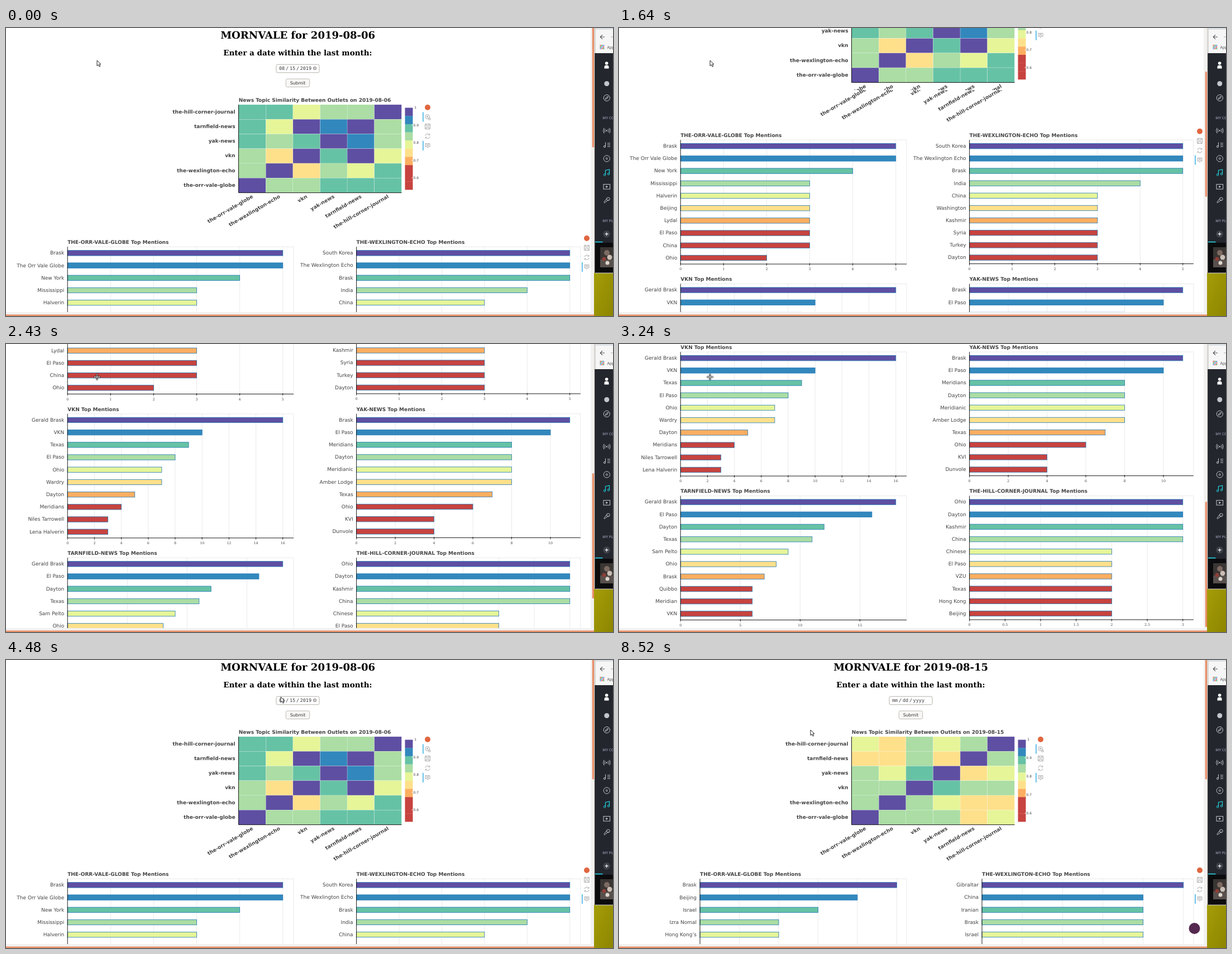
Recreate the animation shown at these times as an HTML page. Size 1087 by 515 pixels, loop 9540 ms.

```html
<!DOCTYPE html>
<html lang="en">
<head>
<meta charset="utf-8">
<title>News topic dashboard</title>
<style>
  html, body { margin: 0; width: 100%; height: 100%; overflow: hidden; background: #fff; }
  svg { display: block; }
  text { font: 9px "DejaVu Sans", sans-serif; fill: #444; white-space: pre; text-rendering: geometricPrecision; }
  .b { font-weight: bold; }
  .e { text-anchor: end; }
  .m { text-anchor: middle; }
  .h1 { font: bold 18px "DejaVu Serif", serif; fill: #000; }
  .h2 { font: bold 13.5px "DejaVu Serif", serif; fill: #000; }
  .tick { font: 6.3px "DejaVu Serif", serif; }
  .scale { font-size: 6px; }
  .mono { font: 8.5px "DejaVu Sans Mono", monospace; fill: #3c3c3c; }
  .button { font-size: 7.8px; fill: #333; }
  .cal { font-size: 6.4px; fill: #3f3f3f; }
  .cal.off { fill: #aaa; }
  .cal.end { fill: #c0392b; }
  .cal.day { fill: #8f9ba5; }
  .cal.rest { fill: #cf8d82; }
  .cal.on { fill: #fbe3c9; }
  .side { font: bold 6.3px "Open Sans", sans-serif; fill: #85879c; }
  .apps { font: 7px "Open Sans", sans-serif; fill: #444; }
  .status { font-size: 7.5px; fill: #333; }
  .line { fill: none; stroke: #a3a3a3; stroke-width: .9; }
  .nav { fill: none; stroke: #c3c6cb; stroke-width: 1; }
  #calendar { filter: drop-shadow(0 1px 2px rgba(0, 0, 0, .35)); }
</style>
</head>
<body>
<svg id="stage" width="1087" height="515" viewBox="0 0 1087 515"></svg>
<script>
const LOOP = 9540;
const PURPLE = '#5e4fa2', BLUE = '#3288bd', TEAL = '#66c2a5', GREEN = '#abdda4',
      LIME = '#e6f598', SAND = '#fee08b', AMBER = '#fdae61', RED = '#c7433f';
const PALETTE = [PURPLE, BLUE, TEAL, GREEN, LIME, SAND, AMBER, RED, RED, RED];
const CELL = { P: PURPLE, B: BLUE, T: TEAL, G: GREEN, Y: LIME, O: SAND };
const OUTLETS = ['the-hill-corner-journal', 'tarnfield-news', 'yak-news', 'vkn',
                 'the-wexlington-echo', 'the-orr-vale-globe'];

const text = (x, y, s, cls = '', more = '') => `<text x="${x}" y="${y}" class="${cls}" ${more}>${s}</text>`;
const rect = (x, y, w, h, fill, more = '') =>
  `<rect x="${x}" y="${y}" width="${w}" height="${h}" fill="${fill}" ${more}/>`;
const path = (d, more = 'class="line"') => `<path d="${d}" ${more}/>`;
const circle = (x, y, r, more) => `<circle cx="${x}" cy="${y}" r="${r}" ${more}/>`;
const group = (id, ...parts) => `<g id="${id}">${parts.join('')}</g>`;
const at = (x, y, s) => `<g transform="translate(${x} ${y})">${s}</g>`;
const range = n => [...Array(n).keys()];

// ---- plot tools
const ICON = {
  zoom: circle(-.5, -.5, 3.8, 'class="line"') + path('M-2.5-.5h4M-.5-2.5v4M2 2h3v3h-3z'),
  save: path('M-4.5-4.5h9v9h-9zM-2.5-4.5v3h5v-3M-2.5 4.5v-3.5h5v3.5'),
  reset: path('M-4-.8A4 4 0 0 1 3.4-2.2M4 .8A4 4 0 0 1-3.4 2.2M3.8-4.4v2.4h-2.4M-3.8 4.4v-2.4h2.4'),
  hover: path('M-4-3.8h8v5.6h-2.6L0 4-1.4 1.8H-4zM-2.4-2h4.8M-2.4 0h4.8')
};
const toolbar = (x, y, names, active) =>
  circle(x, y, 5, 'fill="#e0663f"') +
  names.map((n, i) => at(x, y + 17.1 * (i + 1), ICON[n])).join('') +
  active.map(i => rect(x - 8.8, y + 17.1 * (i + 1) - 8.5, 1.4, 17, '#26aae1')).join('');

// ---- heat map
function heatmap(date, rows, gap) {
  const w = 48.6, h = 26.25, x0 = 416.7, y0 = 137;
  let s = text(416.7, 131.7, 'News Topic Similarity Between Outlets on ' + date, 'b');
  rows.split(' ').forEach((row, r) => {
    [...row].forEach((c, i) => {
      s += rect(x0 + i * w, y0 + r * h, w, h, CELL[c], 'stroke="#fff" stroke-opacity=".45" stroke-width=".5"');
    });
    s += text(410.5, y0 + h * (r + .5) + 2.6, OUTLETS[r], 'b e');
    const x = x0 + w * (5.5 - r) + 2;
    s += text(x, 303, OUTLETS[r], 'b e', `transform="rotate(-30 ${x} 303)"`);
  });
  s += path('M416.5 137V294.6H708.5', 'fill="none" stroke="#000" stroke-width=".9"');
  PALETTE.forEach((c, i) => { s += rect(714.5, 142.6 + i * 14.65, 14, 14.9, c); });
  range(5).forEach(i => {
    const y = 142 + i * gap;
    if (i) s += path(`M726 ${y}h2.5`, 'stroke="#fff" stroke-width=".7"');
    s += text(i ? 729.6 : 731.3, y + 2.1, i ? '0.' + (10 - i) : '1', 'scale');
  });
  return s + toolbar(755, 142, ['zoom', 'save', 'reset', 'hover'], [0, 3]);
}

// ---- bar charts, two columns by three rows
function chart(col, row, title, max, step, labels, values, x0 = col ? 627.6 : 110.2) {
  const right = col ? 1028.8 : 515, top = 391.3 + 257.4 * row, bottom = top + 222 - col * .5;
  const scale = (right - x0) / 1.05 / max;
  let s = text(x0, top - 5, title.toUpperCase() + ' Top Mentions', 'b');
  s += path(`M${x0} ${top}H${right}V${bottom}`, 'fill="none" stroke="#e5e5e5" stroke-width=".8"');
  for (let v = step; v <= max; v += step) {
    s += path(`M${x0 + v * scale} ${top}V${bottom}`, 'stroke="#e5e5e5" stroke-width=".8"');
  }
  const vals = values.split(' ');
  labels.split(',').forEach((name, i) => {
    const y = top + 11.1 + 22.2 * i - col * .05 * i;
    s += rect(x0, y - 4.7, vals[i] * scale, 9.4, PALETTE[i], 'stroke="#1f77b4" stroke-width=".8"');
    s += text(x0 - 6, y + 2.9, name, 'e');
  });
  s += path(`M${x0} ${top}V${bottom}H${right}`, 'fill="none" stroke="#000" stroke-width=".9"');
  for (let v = 0; v <= max; v += step) {
    const x = x0 + v * scale;
    s += path(`M${x} ${bottom - 1.5}v4.5`, 'stroke="#000" stroke-width=".8"') + text(x, bottom + 11.3, v, 'tick m');
  }
  return s;
}

const lower = toolbar(1040, 376, ['save', 'reset', 'hover'], [2]);

const before = group('before',
  heatmap('2019-08-06', 'TTYGGP TYPBPG TGTPBG GOPTPY GPOGYT PGGTTT', 31.5),
  chart(0, 0, OUTLETS[5], 5, 1, 'Brask,The Orr Vale Globe,New York,Mississippi,Halverin,Beijing,Lydal,El Paso,China,Ohio', '5 5 4 3 3 3 3 3 3 2'),
  chart(1, 0, OUTLETS[4], 5, 1, 'South Korea,The Wexlington Echo,Brask,India,China,Washington,Kashmir,Syria,Turkey,Dayton', '5 5 5 4 3 3 3 3 3 3'),
  chart(0, 1, OUTLETS[3], 16, 2, 'Gerald Brask,VKN,Texas,El Paso,Ohio,Wardry,Dayton,Meridians,Niles Tarrowell,Lena Halverin', '16 10 9 8 7 7 5 4 3 3'),
  chart(1, 1, OUTLETS[2], 11, 2, 'Brask,El Paso,Meridians,Dayton,Meridianic,Amber Lodge,Texas,Ohio,KVI,Dunvole', '11 10 8 8 8 8 7 6 4 4'),
  chart(0, 2, OUTLETS[1], 18, 5, 'Gerald Brask,El Paso,Dayton,Texas,Sam Pelto,Ohio,Brask,Quibbo,Meridian,VKN', '18 16 12 11 9 8 7 6 6 6'),
  chart(1, 2, OUTLETS[0], 3, .5, 'Ohio,Dayton,Kashmir,China,Chinese,El Paso,VZU,Texas,Hong Kong,Beijing', '3 3 3 3 2 2 2 2 2 2'),
  lower);

const after = group('after',
  heatmap('2019-08-15', 'YOGYGP OOGOPG GYTPOY GGPTGG GPGYOO PGGGOY', 33),
  chart(0, 0, OUTLETS[5], 5, 1, 'Brask,Beijing,Israel,Izra Nomal,Hong Kong’s', '5 4 3 2 2', 145),
  chart(1, 0, OUTLETS[4], 5, 1, 'Gibraltar,China,Iranian,Brask,Israel', '5 4 4 4 4', 650),
  lower);

// ---- header and form
const dateText = (...parts) =>
  [parts[0], '/', parts[1], '/', parts[2]].map((p, i) => text([489, 501, 508, 520, 526.6][i], 75.3, p, 'mono')).join('');
const header = group('header',
  text(522.6, 19.4, '', 'h1 m', 'id="heading"'),
  text(522.4, 49, 'Enter a date within the last month:', 'h2 m'),
  rect(484, 65.2, 77, 14.6, '#fff', 'rx="2.5" stroke="#b6b1ab" id="field"'),
  group('focus', rect(488, 67, 13, 10.6, '#f09f47')),
  group('filled', dateText('08', '15', '2019'), circle(553, 72, 3.2, 'fill="#a8a8a8"'),
    path('M551.8 70.8l2.4 2.4m0-2.4l-2.4 2.4', 'stroke="#fff" stroke-width=".8"')),
  group('blank', dateText('mm', 'dd', 'yyyy')),
  rect(501.3, 91, 42.4, 14.4, '#f8f7f6', 'rx="2.5" stroke="#c0bbb5"'),
  text(522.5, 101, 'Submit', 'button m'));

// ---- date picker
function calendar() {
  const x = i => 500.4 + 18.65 * i;
  let s = rect(485, 86, 142.6, 128.6, '#fff', 'stroke="#c9c5c1" stroke-width=".8"');
  s += path('M501.5 95.5l-3.5 3.5 3.5 3.5M611.5 95.5l3.5 3.5-3.5 3.5', 'fill="none" stroke="#666"');
  s += rect(524.5, 93.7, 63, 10.8, '#fff', 'rx="2" stroke="#c4c0bb" stroke-width=".8"');
  s += text(531.3, 101.6, 'August 2019', 'cal') + path('M577.8 98l2.4 2.4 2.4-2.4', 'fill="none" stroke="#777" stroke-width=".8"');
  ['Sun', 'Mon', 'Tue', 'Wed', 'Thu', 'Fri', 'Sat'].forEach((d, i) => {
    s += text(x(i), 119.4, d, 'cal m ' + (i % 6 ? 'day' : 'rest'));
  });
  s += rect(566.8, 153.2, 16.4, 13, '#ef9d45', 'rx="1"');
  range(42).forEach(n => {
    const d = n - 3, off = d < 1 || d > 31;
    const cls = off ? 'off' : d === 15 ? 'on' : n % 7 % 6 ? '' : 'end';
    s += text(x(n % 7), 133.8 + 14.15 * Math.floor(n / 7), d < 1 ? d + 31 : d > 31 ? d - 31 : d, 'cal m ' + cls);
  });
  return s;
}

// ---- neighbouring windows
const dots = ['#e04a3f', '#3f9d57', '#4a86e0'];
const nav = 'class="nav"';
const side = [
  rect(1053, 0, 34, 515, '#d9d6d2'),
  rect(1053, 438, 34, 77, 'url(#wall)'),
  rect(1056, 0, 31, 46, '#f6f6f6'), rect(1056, 0, 31, 3, '#dee1e6'),
  path('M1072 16h-7.5M1068 12.2l-3.8 3.8 3.8 3.8', 'fill="none" stroke="#555" stroke-width="1.2"'),
  path('M1083 16h6', 'stroke="#bbb" stroke-width="1.2"'),
  ...range(9).map(i => rect(1063.6 + i % 3 * 2.8, 30.2 + Math.floor(i / 3) * 2.8, 2, 2, dots[(i + Math.floor(i / 3)) % 3])),
  text(1076.5, 37.2, 'Apps', 'apps'),
  rect(1055, 45, 32, 393, '#23262d'), rect(1055, 384, 32, 54, '#0c0c0e'),
  rect(1055, 437.6, 32, 1, '#d8d8d8'), rect(1054.3, 45, 1, 393, '#111'),
  circle(1075.6, 63, 2.8, 'fill="#fff"'), path('M1071.5 72.5v-3q0-3 4-3t4 3v3z', 'fill="#fff"'),
  circle(1075.8, 99.5, 4.5, 'fill="#c3c6cb"'),
  circle(1075.8, 125, 5.6, nav), path('M1078.5 122.3l-1.7 3.7-3.7 1.7 1.7-3.7z', nav),
  text(1068.3, 162.7, 'MY COLLECTION', 'side'),
  circle(1075.8, 183.5, 1.3, 'fill="#c3c6cb"'),
  path('M1073 180.5q-1.8 3 0 6M1078.6 180.5q1.8 3 0 6M1071 178.7q-3 4.8 0 9.6M1080.6 178.7q3 4.8 0 9.6', nav),
  path('M1073.5 212v-7.5M1077 206h5M1077 209h5M1077 212h5', nav), circle(1072, 212, 1.6, nav),
  circle(1075.8, 233.5, 5.6, nav), circle(1075.8, 233.5, 1.5, nav),
  path('M1073.5 262.5v-8l7-1.6v8', 'fill="none" stroke="#1fd3e0" stroke-width="1.2"'),
  circle(1072, 262.5, 1.7, 'fill="none" stroke="#1fd3e0"'), circle(1079, 261, 1.7, 'fill="none" stroke="#1fd3e0"'),
  rect(1070, 279.5, 11.6, 8.6, 'none', nav), path('M1074.4 281.6l3.6 2.2-3.6 2.2z', 'fill="#c3c6cb"'),
  circle(1078.4, 305.8, 2.8, nav), path('M1076.3 304.3l-5.6 7.4 1 1 7.4-5.6', nav),
  text(1068.3, 347.3, 'MY PLAYLISTS', 'side'),
  circle(1075.6, 368.4, 6.4, 'fill="#3d4048"'), path('M1072.6 368.4h6M1075.6 365.4v6', 'stroke="#fff" stroke-width="1.1"'),
  rect(1055, 381.8, 13.5, 1.6, '#1fd3e0'),
  rect(1064, 392, 23, 36, '#3a3634'), rect(1064, 414, 23, 14, '#57504c'),
  circle(1076, 402, 5, 'fill="#7d6a62"'), circle(1081, 410, 4.5, 'fill="#c9bdb4"'),
  circle(1071, 413, 3.5, 'fill="#8e3f38"'), circle(1077, 420, 3.5, 'fill="#ddd4cb"')
].join('');

const cross = 'M0-5.6V-2M0 2V5.6M-5.6 0H-2M2 0H5.6';
document.getElementById('stage').innerHTML = `
  <defs>
    <linearGradient id="wall" x1="0" y1="0" x2="1" y2="1">
      <stop offset="0" stop-color="#a59d08"/><stop offset="1" stop-color="#8d8500"/>
    </linearGradient>
    <clipPath id="strip"><rect width="1047" height="111"/></clipPath>
  </defs>` +
  rect(0, 0, 1053, 515, '#f2f1f0') +
  `<svg width="1047" height="508">` + rect(0, 0, 1047, 508, '#fff') +
    group('page', header, before, after) +
    `<g id="tear" clip-path="url(#strip)">` + rect(0, 0, 1047, 111, '#fff') +
      `<use href="#page" transform="translate(0 -6)"/></g>` +
    group('badge', circle(1030.5, 480, 10, 'fill="#54284f"')) +
  `</svg>` +
  rect(1049.8, 0, 3.4, 224, '#e98e68', 'id="thumb" rx="1.5"') +
  rect(0, 512.4, 1053.5, 2.6, '#ec916b') +
  side +
  group('calendar', calendar()) +
  group('status', rect(0, 502.5, 180.5, 12.5, '#eeedec', 'stroke="#bbb" stroke-width=".8"'),
    text(4, 511.4, 'Transferring data from localhost…', 'status')) +
  group('cursor',
    group('arrow', path('M0 0V9.8L2.3 7.6 4 11.2 5.7 10.4 4.1 6.9H7Z', 'fill="#fff" stroke="#111" stroke-width=".9"')),
    group('plus', at(0, 1, path(cross, 'stroke="#111" stroke-width="3.2"') + circle(0, 0, 1.8, 'fill="#fff" stroke="#111" stroke-width=".8"') +
      path('M0-5V-2.2M0 2.2V5M-5 0H-2.2M2.2 0H5', 'stroke="#fff" stroke-width="1.3"'))));

// ---- motion: keys are [time, values, steps to next key, ease-out]
const SCROLL = [
  [0, [0]], [1210, [8], 8], [1640, [191.2], 10, .2], [2160, [367]], [2220, [374], 8, .3], [2630, [634.6]],
  [3240, [634.6], 5], [3530, [318], 7, .47], [3960, [0]]
];
const POINTER = [
  [0, [163, 58]], [4150, [190, 61], 2], [4230, [390, 79], 2], [4310, [490, 68]],
  [4480, [492, 66], 3], [4655, [503, 56], 3], [4830, [514, 66]],
  [5290, [517, 70], 6], [5590, [574, 148], 2], [5690, [551, 158]],
  [5980, [557, 158], 2], [6080, [576, 158]],
  [6330, [572, 148], 4], [6520, [524, 96], 6], [6820, [343, 125]]
];
function sample(keys, t) {
  let i = keys.length - 1;
  while (keys[i][0] > t) i--;
  const [t0, from, n = 1, ease = 0] = keys[i];
  if (i === keys.length - 1) return from;
  const [t1, to] = keys[i + 1];
  const u = Math.floor((t - t0) / (t1 - t0) * n + 1e-6) / n;
  const k = u * (1 + ease - ease * u);
  return from.map((v, j) => v + (to[j] - v) * k);
}

const $ = id => document.getElementById(id);
const show = (id, on) => { $(id).style.display = on ? '' : 'none'; };
const move = (id, x, y) => $(id).setAttribute('transform', `translate(${x} ${y})`);

function draw(t) {
  const within = (a, b) => t >= a && t < b;
  const [y] = sample(SCROLL, t);
  const old = t < 7870, done = t >= 8520;
  const focus = within(4830, 6520);
  const plus = within(2220, 4150) || within(6700, 7870);

  move('page', 0, -y);
  move('thumb', 0, -10.5 + y * .461);
  move('cursor', ...sample(POINTER, t));
  $('heading').textContent = 'MORNVALE for ' + (old ? '2019-08-06' : '2019-08-15');
  $('field').setAttribute('stroke', focus ? '#e9944a' : '#b6b1ab');

  show('header', old || t >= 7980);
  show('before', old);
  show('after', done);
  show('filled', old);
  show('blank', !old);
  show('focus', focus);
  show('calendar', within(5000, 6330));
  show('tear', within(1640, 1690));
  show('status', within(7600, 8520));
  show('thumb', old || done);
  show('badge', done);
  show('arrow', !plus);
  show('plus', plus);
}

const start = performance.now();
function frame() {
  draw((performance.now() - start) % LOOP);
  requestAnimationFrame(frame);
}
frame();
</script>
</body>
</html>
```
